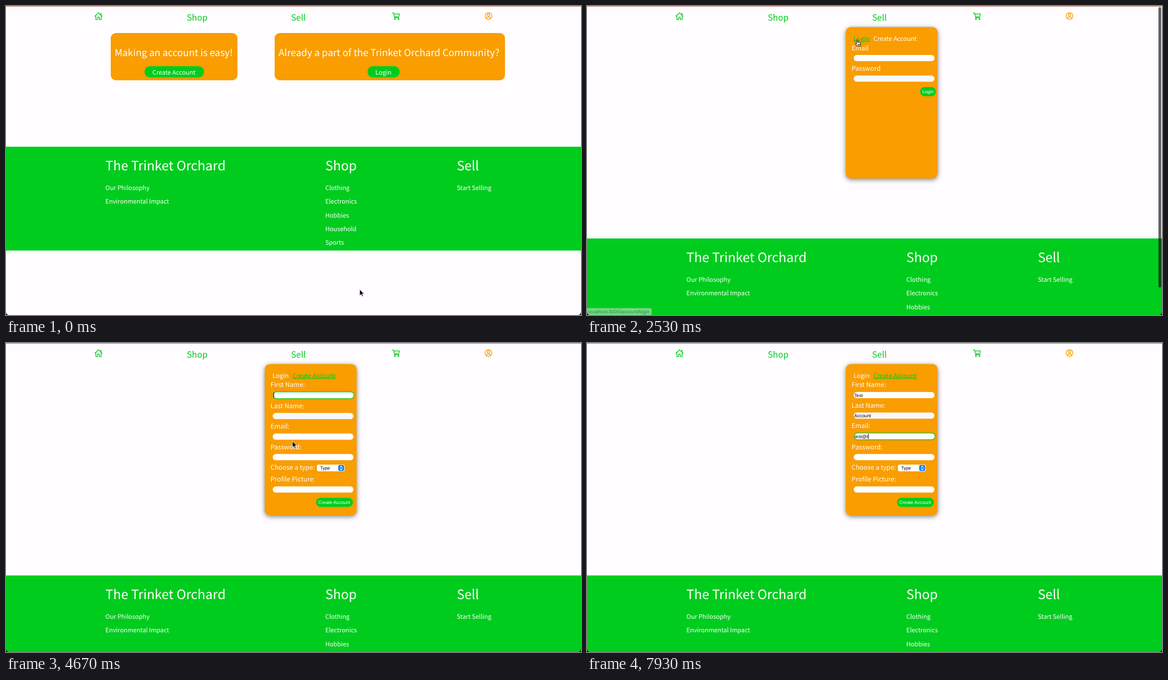
Animation, 1021 px wide and 549 px high, one loop 8000 ms. Source, as an HTML page:

```html
<!DOCTYPE html>
<html lang="en">
<head>
<meta charset="utf-8">
<title>Shop account</title>
<style>
  html, body { margin: 0; width: 100%; height: 100%; overflow: hidden; background: #fffdff; }
  svg { display: block; width: 100vw; height: 100vh; }
  text { font-family: 'Noto Sans CJK JP', 'Noto Sans CJK SC', 'Noto Sans CJK', 'Noto Sans', sans-serif;
         text-rendering: geometricPrecision; white-space: pre; }
  .ui { font-family: 'Liberation Sans', Arial, sans-serif; }
  .active { text-decoration: underline; text-decoration-thickness: 1px; text-underline-offset: 1.5px; }
  .panel { filter: drop-shadow(0 2px 4px rgba(0, 0, 0, .5)); }
  .icon { fill: none; stroke-width: 1.25; stroke-linejoin: round; stroke-linecap: round; }
</style>
</head>
<body>
<svg id="stage" viewBox="0 0 1021 549"></svg>
<script>
const stage = document.getElementById('stage');
const GREEN = '#00cc1e', ORANGE = '#f99d00', WHITE = '#fff';
const FPS = 15, LOOP = 8000;
const measure = document.createElement('canvas').getContext('2d');
measure.font = "8.3px 'Liberation Sans', Arial, sans-serif";

const text = (x, y, size, string, fill = WHITE, cls = '') =>
  `<text x="${x}" y="${y}" font-size="${size}" fill="${fill}" class="${cls}">${string}</text>`;
const rect = (x, y, w, h, r, fill, extra = '') =>
  `<rect x="${x}" y="${y}" width="${w}" height="${h}" rx="${r}" fill="${fill}" ${extra}/>`;

// Pointer stops: [frame, x, y]
const POINTER = [
  [0, 628, 503.5], [4, 358.7, 120.5], [8, 358.7, 120.5], [12, 329.8, 119], [22, 329.8, 119],
  [26, 471.5, 77.5], [27, 471.5, 77.5], [30, 479.5, 59], [38, 479.5, 59],
  [47, 541.8, 57.5], [62, 541.8, 57.5], [68, 508.5, 174.5], [75, 508.5, 174.5]
];
const FIELD_Y = [87, 123.5, 160, 196.5, 254];
const ENTRIES = [
  { focus: 70, value: 'Test', keys: [74, 78, 80, 81] },
  { focus: 86, value: 'Account', keys: [91, 94, 96, 98, 99, 101, 101] },
  { focus: 103, value: 'test@t', keys: [108, 110, 111, 112, 116, 119] }
];
// Link previews: address, box width, [frame, opacity] steps
const PREVIEWS = [
  ['create', 120, [[15, .35], [16, .7], [17, 1], [18, 0]]],
  ['login', 115, [[33, .5], [34, 1], [38, .5], [39, .3], [40, .1], [41, 0]]],
  ['create', 120, [[49, .5], [50, 1], [60, .5], [61, .3], [62, .1], [63, 0]]]
];

function nav() {
  return rect(0, 0, 1021, 1, 0, '#b76f60') +
    text(321, 25.5, 15.2, 'Shop', GREEN) + text(506.3, 25.5, 15.2, 'Sell', GREEN) +
    `<g class="icon" stroke="${GREEN}">
      <path d="M157.8 18.2 164.3 12l6.5 6.2M159.6 16.8V24h3.2v-4.2h3V24h3.2v-7.2M168.7 12.6v3"/>
      <path d="M686 12.4h2.2l1.9 8.2h7.7M688.7 14.2h10l-1.2 4.6-7.8.5"/>
      <circle cx="690.6" cy="23" r="1"/><circle cx="696.9" cy="23" r="1"/>
    </g>
    <g class="icon" stroke="${ORANGE}">
      <circle cx="856.7" cy="17.8" r="6"/><circle cx="856.7" cy="16" r="2.1"/>
      <path d="M852.8 22.1q.8-2.4 3.9-2.4t3.9 2.4"/>
    </g>`;
}

function footer(top) {
  const list = (x, title, items) => text(x, 42, 23, title) +
    items.map((item, i) => text(x, 77.3 + i * 24.1, 10.9, item)).join('');
  return `<g transform="translate(0 ${top})">` + rect(0, 0, 1021, 184.5, 0, GREEN) +
    list(176.6, 'The Trinket Orchard', []) +
    list(176.6, '', ['Our Philosophy', 'Environmental Impact']) +
    list(567, 'Shop', ['Clothing', 'Electronics', 'Hobbies', 'Household', 'Sports']) +
    list(800.4, 'Sell', ['Start Selling']) + '</g>';
}

function welcome() {
  return rect(186, 48, 225, 84, 9, ORANGE) + text(193, 89, 17, 'Making an account is easy!') +
    rect(246, 107, 105.5, 20, 9.5, GREEN) + text(260, 121.6, 10.9, 'Create Account') +
    rect(477, 48, 409, 84, 9, ORANGE) +
    text(484, 89, 17, 'Already a part of the Trinket Orchard Community?') +
    rect(642, 107, 57, 20, 9.5, GREEN) + text(655.8, 121.6, 11.1, 'Login');
}

function panel(login) {
  const tab = (x, size, label, on) => text(x, 61.5, size, label, on ? GREEN : WHITE, on ? 'active' : '');
  return rect(459.5, 37.5, 163, 269, 9, ORANGE, 'class="panel"') +
    tab(473.3, 11.1, 'Login', login) + tab(508.7, 10.95, 'Create Account', !login);
}

const label = (y, string) => text(469.8, y, 11.5, string);
const button = (x, y, w, string) => rect(x, y, w, 16.3, 8.1, GREEN) +
  text(x + 4, y + 11.1, 8.25, string, WHITE, 'ui');

function input(y, i, value = '', focused = false) {
  const fill = i === 1 ? '#f7f8ff' : WHITE;
  const shape = focused
    ? rect(474, y - .2, 144, 12, 6, fill, `stroke="${GREEN}" stroke-width="1.2"`)
    : rect(473.6, y, 143.4, 11, 5.5, fill);
  const x = focused ? 475 : 474.4;
  const caret = focused ? rect(x + measure.measureText(value).width + .2, y + 1, .9, 9.5, 0, '#000') : '';
  return shape + text(x, y + 8.6, 8.3, value, '#000', 'ui') + caret;
}

function loginForm() {
  return panel(true) + label(78.5, 'Email') + input(FIELD_Y[0], 0) +
    label(115, 'Password') + input(FIELD_Y[1], 1) + button(591.4, 144, 28, 'Login');
}

function createForm(frame) {
  const focus = ENTRIES.filter(e => frame >= e.focus).length - 1;
  const grow = focus < 0 ? 0 : .8;
  const shift = i => i > focus ? grow : 0;
  const names = ['First Name:', 'Last Name:', 'Email:', 'Password:', 'Profile Picture:'];
  const rows = names.map((name, i) => {
    const y = FIELD_Y[i] + shift(i), entry = ENTRIES[i];
    const value = entry ? entry.value.slice(0, entry.keys.filter(k => k <= frame).length) : '';
    return label(y - 8.6, name) + input(y, i, value, i === focus);
  }).join('');
  const select = `<g transform="translate(0 ${grow})">` + label(224.6, 'Choose a type:') +
    rect(552, 215.2, 49.3, 12, 3, WHITE) + text(557.8, 224.4, 8.1, 'Type', '#000', 'ui') +
    rect(590, 216, 10.3, 10.4, 2.6, '#0b79f5') +
    '<path class="icon" stroke="#fff" d="M593.3 220l1.9-1.9 1.9 1.9m0 2.5-1.9 1.9-1.9-1.9"/></g>';
  return panel(false) + rows + select + button(550.6, 275, 65.4, 'Create Account');
}

function scrollbar(frame) {
  const alpha = Math.max(0, Math.min(1, (57 - frame) / 3)) * .62;
  return rect(1014.7, 2, 5, 498, 2.5, '#000', `opacity="${alpha}"`);
}

function previews(frame) {
  return PREVIEWS.map(([page, width, steps]) => {
    const step = steps.filter(s => s[0] <= frame).pop();
    if (!step || !step[1]) return '';
    return `<g opacity="${step[1]}">` + rect(-2, 537, width + 1.5, 14, 2, '#e9e9eb', 'stroke="#c4c4c6" stroke-width=".8"') +
      text(2.3, 546.2, 8.58, 'localhost:3000/account/' + page, '#505054', 'ui') + '</g>';
  }).join('');
}

function pointer(frame) {
  if (frame >= 75) return '';
  const next = POINTER.findIndex(p => p[0] > frame);
  const [f0, x0, y0] = POINTER[next - 1], [f1, x1, y1] = POINTER[next];
  const p = (frame - f0) / (f1 - f0), k = p * p * (3 - 2 * p);
  const x = x0 + (x1 - x0) * k, y = y0 + (y1 - y0) * k;
  const onLink = frame >= 33 && y < 66 && (x < 503 || x > 508);
  return onLink
    ? `<path transform="translate(${x - 3} ${y})" fill="#fff" stroke="#000" stroke-width=".9"
        d="M3 .6c1 0 1.2.6 1.2 1.2v3.4l4.2.9c.9.2 1.2.8 1.1 1.6l-.6 3c-.2.9-.6 1.3-.6 2.3H3.4C3 11.5.6 9.5.3 8c-.2-1 1-1 2 .3V1.8C2.3 1 2.4.6 3 .6ZM4.4 8.5v2.8M6 8.5v2.8M7.5 8.5v2.8"/>`
    : `<path transform="translate(${x} ${y})" stroke="#fff" stroke-width=".8"
        d="M0 0V11.2L2.6 8.8 4.4 12.8 6.2 12 4.5 8.1H8Z"/>`;
}

function draw(frame) {
  const form = frame >= 18;
  const body = !form ? welcome() : frame >= 38 && frame < 60 ? loginForm() : createForm(frame);
  stage.innerHTML = rect(0, 0, 1021, 549, 0, '#fffdff') + nav() + footer(form ? 413 : 250) + body +
    (form ? scrollbar(frame) : '') + previews(frame) +
    '<path d="M0 549v-6q0 6 6 6zM1021 549v-6q0 6-6 6z"/>' + pointer(frame);
}

let shown = -1;
function tick() {
  const frame = Math.floor((performance.now() % LOOP + 5) * FPS / 1000);
  if (frame !== shown) draw(shown = frame);
  requestAnimationFrame(tick);
}
tick();
</script>
</body>
</html>
```
